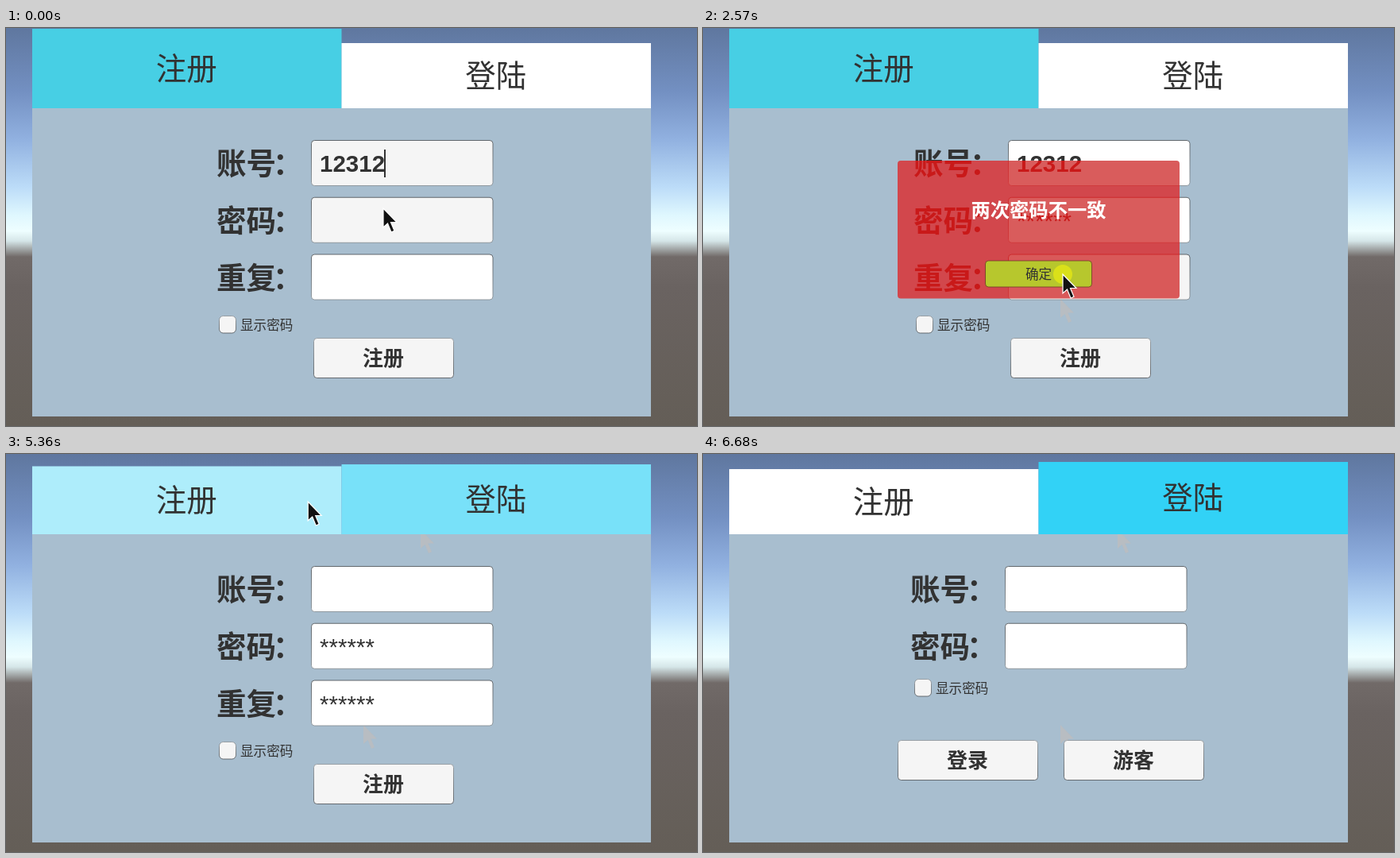
An HTML page for the animation above (6950 ms loop, 870 by 501 pixels).

```html
<!DOCTYPE html>
<html lang="zh-CN">
<head>
<meta charset="utf-8">
<title>注册 / 登陆</title>
<style>
  html, body { margin: 0; width: 100%; height: 100%; overflow: hidden; background: #645e57; }
  svg { display: block; width: 870px; height: 501px; isolation: isolate; }
  text { font-family: 'Noto Sans CJK SC', 'Noto Sans CJK', sans-serif; fill: #323232; white-space: pre; }
  .value { font: bold 29.5px 'Liberation Sans', Arial, sans-serif; }
  .secret { font-weight: normal; }
</style>
</head>
<body>
<svg viewBox="0 0 870 501">
  <defs>
    <linearGradient id="sky" x2="0" y2="1">
      <stop offset="0" stop-color="#5f779f"/>
      <stop offset=".16" stop-color="#7390c2"/>
      <stop offset=".28" stop-color="#91b1e0"/>
      <stop offset=".4" stop-color="#bcdcf8"/>
      <stop offset=".47" stop-color="#dff7fe"/>
      <stop offset=".51" stop-color="#eefeff"/>
      <stop offset=".535" stop-color="#d5e6e8"/>
      <stop offset=".575" stop-color="#716a68"/>
      <stop offset=".65" stop-color="#6a6361"/>
      <stop offset="1" stop-color="#645e57"/>
    </linearGradient>
    <linearGradient id="sunken" x2="0" y2="1">
      <stop offset="0" stop-color="#45494d"/>
      <stop offset="1" stop-color="#7f878d"/>
    </linearGradient>
    <linearGradient id="raised" x2="0" y2="1">
      <stop offset="0" stop-color="#8a9095"/>
      <stop offset="1" stop-color="#4b4f53"/>
    </linearGradient>
  </defs>
  <rect width="870" height="501" fill="url(#sky)"/>
  <g id="stage"></g>
</svg>
<script>
const LOOP = 6950, GLIDE = 210, REST = 140, DELAY = 70;
const stage = document.getElementById('stage');

// The pointer's stops; each one with a target is a click at that time.
const stop = (at, x, y, target) => ({ at, x, y, target });
const stops = [
  stop(200, 475, 227, 'password'),
  stop(970, 455, 320, 'repeat'),
  stop(1600, 450, 414, 'submit'),
  stop(2560, 453, 310, 'confirm'),
  stop(2920, 450, 172, 'account'),
  stop(3550, 502, 400, 'submit'),
  stop(4050, 460, 308, 'confirm'),
  stop(4660, 525, 75, 'loginTab'),
  stop(5220, 330, 60, 'registerTab'),
  stop(5640, 519, 60, 'loginTab'),
  stop(6060, 430, 70),
  stop(6500, 697, 238),
  stop(6750, 850, 492)
];

const clamp = (v, max = 1) => Math.max(0, Math.min(max, v));
const ramp = (t, from, to) => clamp((t - from) / (to - from));
const ease = p => p * p * (3 - 2 * p);
const mix = (a, b, p) => a.map((v, i) => v + (b[i] - v) * p);

const lastClick = (t, ...targets) =>
  stops.filter(s => s.target && s.at <= t && (!targets.length || targets.includes(s.target))).pop();

function pointer(t) {
  let place = [stops[0].x, stops[0].y];
  for (const s of stops)
    place = mix(place, [s.x, s.y], ease(ramp(t, s.at - REST - GLIDE, s.at - REST)));
  return place;
}

const inside = ([px, py], x, y, w, h) => px >= x && px < x + w && py >= y && py < y + h;

const box = (x, y, w, h, fill, more = '') =>
  `<rect x="${x}" y="${y}" width="${w}" height="${h}" fill="${fill}" ${more}/>`;

// Chinese text placed by the middle of its glyphs
const label = (text, x, middle, size, weight, more = '') =>
  `<text x="${x}" y="${middle + size * .36}" font-size="${size}" font-weight="${weight}" ${more}>${text}</text>`;

const centered = (text, x, middle, size, weight, more = '') =>
  label(text, x, middle, size, weight, 'text-anchor="middle" ' + more);

const WHITE = [255, 255, 255], GREY = [216, 218, 217], CYAN = [30, 205, 245], TEAL = [71, 207, 228];

// A tab rises and turns from its resting colour to cyan, then teal at full height.
function tab(text, x, lift, hover = 0) {
  const top = 19 - 18 * lift;
  const raised = mix(mix(WHITE, GREY, hover), CYAN, clamp(lift / .55));
  const colour = mix(raised, TEAL, ramp(lift, .78, 1)).map(Math.round);
  return box(x, top, 389.5, 101 - top, `rgb(${colour})`) +
    centered(text, x + 194.2, (top + 101) / 2, 38.5, 300);
}

function tabs(t) {
  const registerLift = 1 - ramp(t, 4700, 5060) + .78 * (ramp(t, 5290, 5570) - ramp(t, 5710, 5920));
  const loginLift = .5 * (ramp(t, 4780, 4980) - ramp(t, 5290, 5500) + ramp(t, 5720, 5920));
  const hover = ramp(t, 4660, 4800) - ramp(t, 5080, 5220) + ramp(t, 5570, 5640) - ramp(t, 5780, 5920);
  return tab('注册', 33, registerLift) + tab('登陆', 422.5, loginLift, hover);
}

function field(x, y, text = '', hover = false, focus = false) {
  const secret = text[0] === '*';
  const caretX = Math.round(x + 11 + text.length * (secret ? 11.48 : 16.41));
  return box(x + .5, y + .5, 228.5, 57, hover || focus ? '#f5f5f5' : '#fff',
      'rx="4" stroke="url(#sunken)" stroke-opacity=".8"') +
    `<text class="value${secret ? ' secret' : ''}" x="${x + 11}" y="${y + 40}">${text}</text>` +
    (focus ? box(caretX - 1, y + 12, 2, 35, '#323232') : '');
}

const button = (text, x, y, hover) =>
  box(x + .5, y + .5, 176, 50, hover ? '#ebebeb' : '#f5f5f5',
    'rx="4" stroke="url(#raised)" stroke-opacity=".8"') +
  centered(text, x + 88, y + 26, 26, 700);

const checkbox = (x, y) =>
  box(x + .5, y + .5, 21, 21.5, '#f5f5f5', 'rx="5" stroke="url(#raised)" stroke-opacity=".8"') +
  label('显示密码', x + 27, y + 12, 16.6, 300);

const caption = (text, x, row) =>
  label(text + '<tspan dx="-4">：</tspan>', x - 1, 170 + row * 72, 37.5, 700);

const rowY = row => 141 + row * 71.75;

const arrow = (x, y, style) =>
  `<path transform="translate(${x} ${y})" d="M0 0V24L5.5 19L10 30L14 28.3L9.5 17.5H17Z" ${style}/>`;

const typed = (t, from) => '*'.repeat(Math.ceil(6 * ramp(t, from, from + 350)));

function registerForm(t, at) {
  const click = lastClick(t);
  const focus = click ? click.target : 'account';
  const values = {
    account: '12312'.slice(0, 5 - Math.floor(5 * ramp(t, 2920, 3220))),
    password: typed(t, 270),
    repeat: typed(t, 1040)
  };
  const fields = Object.keys(values).map((name, row) =>
    caption(['账号', '密码', '重复'][row], 266, row) +
    field(384, rowY(row), values[name], inside(at, 384, rowY(row), 229, 57), focus === name));
  return fields.join('') + checkbox(268, 362) +
    button('注册', 387, 390, inside(at, 387, 390, 176, 50));
}

const loginForm = () =>
  ['账号', '密码'].map((name, row) => caption(name, 262, row) + field(380, rowY(row))).join('') +
  checkbox(266, 283) + button('登录', 245, 360) + button('游客', 454, 360);

// Multiply plus add reproduces a linear-light red glass.
function popup(message, hover) {
  const glass = (fill, mode) =>
    box(245, 167, 355, 173.5, fill, `rx="4" style="mix-blend-mode:${mode}"`);
  return glass('#155454', 'multiply') + glass('#c40808', 'plus-lighter') +
    centered(message, 422.5, 229, 24.3, 700, 'style="fill:#fff"') +
    box(355.5, 293, 134, 33, hover ? '#b7c72d' : '#d2e635', 'rx="4" stroke="#6d3a24" stroke-width=".8"') +
    centered('确定', 422.5, 310, 16.6, 400);
}

function draw(t) {
  const at = pointer(t), [x, y] = at;
  const page = lastClick(t - DELAY, 'loginTab', 'registerTab');
  const dialog = lastClick(t - 2 * DELAY, 'submit', 'confirm');
  const click = lastClick(t);
  let out = box(33, 101, 779, 388, '#a8becf');

  // Faint trails the pointer leaves on the panel
  for (const [from, tx, ty] of [[1530, 450, 341], [4800, 522, 95]])
    if (t >= from) out += arrow(tx, ty, 'fill="#c8bcb5" opacity=".5"');

  out += tabs(t);
  out += page && page.target === 'loginTab' ? loginForm() : registerForm(t, at);
  if (dialog && dialog.target === 'submit')
    out += popup(dialog === stops[2] ? '两次密码不一致' : '账号密码不能为空！', inside(at, 355, 293, 135, 33));
  if (click && t - click.at < DELAY + 10)
    out += `<circle cx="${x}" cy="${y}" r="12" fill="#e2e614" opacity=".8"/>`;
  if (t < 6670) out += arrow(x, y, 'fill="#111" stroke="#fff" stroke-width="1.2"');
  stage.innerHTML = out;
}

function tick(now) {
  draw(now % LOOP);
  requestAnimationFrame(tick);
}
draw(0);
requestAnimationFrame(tick);
</script>
</body>
</html>
```
